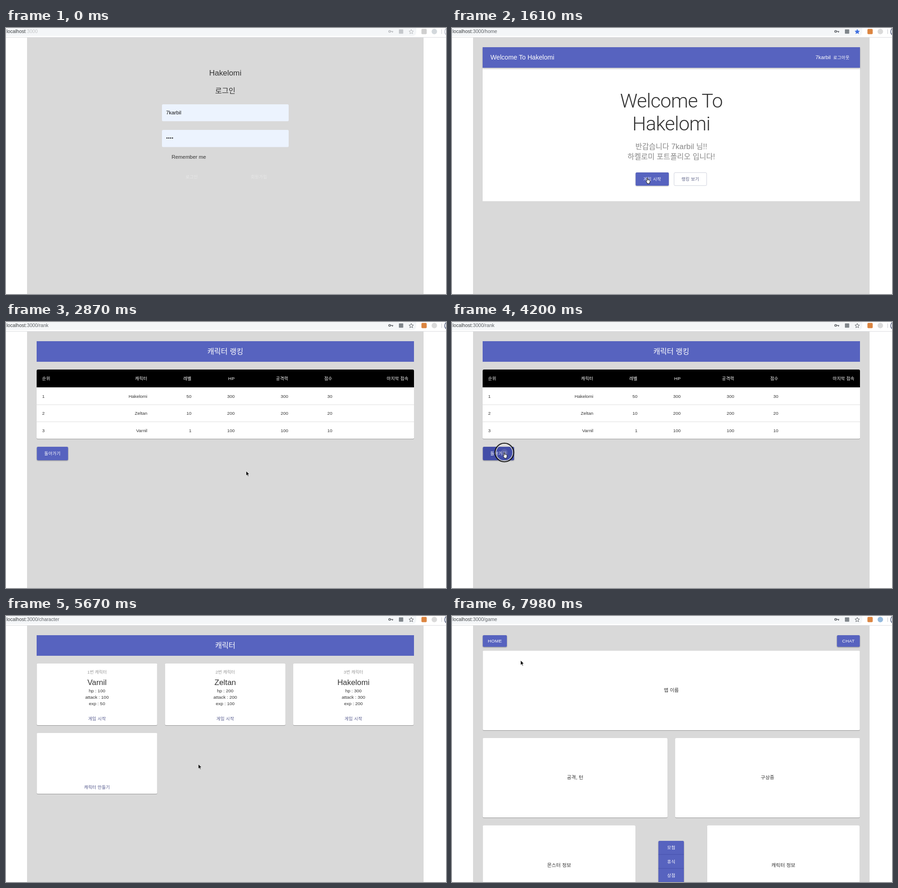
Animation, 962 px wide and 582 px high, one loop 8 s. Source, as an HTML page:

```html
<!DOCTYPE html>
<html lang="ko">
<head>
<meta charset="utf-8">
<title>Game portfolio</title>
<style>
html, body { margin: 0; width: 100%; height: 100%; overflow: hidden; background: #fff; }
svg { display: block; width: 100vw; height: 100vh; }
text { font-family: "Liberation Sans", "Noto Sans CJK KR", "Noto Sans CJK", sans-serif; fill: #333; }
.btn { font-weight: 500; letter-spacing: .28px; }
.light { font-weight: 300; }
.hero { font-family: Roboto, "Liberation Sans", sans-serif; font-weight: 300; letter-spacing: -.7px; }
.paper { fill: #fff; filter: drop-shadow(0 1px .7px rgba(0,0,0,.32)); }
.raised { fill: #5763bf; filter: drop-shadow(0 1px 1px rgba(0,0,0,.35)); }
.bar { fill: #5763bf; }
.shade { filter: drop-shadow(0 2px 1.5px rgba(0,0,0,.25)); }

#login, #home, #rank, #character, #game, .late, .dim, .port, .ext, .badge,
#arrow, #hand, #ring, #ripple, .press { animation: 8s step-end infinite; }

#login { animation-name: login; }
#home { animation-name: home; }
#rank { animation-name: rank; }
#character { animation-name: character; }
#game { animation-name: game; }
@keyframes login { 0% { opacity: 1 } 16.625%, 100% { opacity: 0 } }
@keyframes home { 0% { opacity: 0 } 16.625% { opacity: 1 } 35% { opacity: 0 } 54.25% { opacity: 1 } 69.125%, 100% { opacity: 0 } }
@keyframes rank { 0% { opacity: 0 } 35% { opacity: 1 } 54.25%, 100% { opacity: 0 } }
@keyframes character { 0% { opacity: 0 } 69.125% { opacity: 1 } 87.5%, 100% { opacity: 0 } }
@keyframes game { 0% { opacity: 0 } 87.5%, 100% { opacity: 1 } }

/* the opening moment is washed out */
.late { animation-name: late; }
.dim { animation-name: dim; }
.port { animation-name: port; }
.ext { animation-name: ext; }
.badge { animation-name: badge; }
@keyframes late { 0% { opacity: 0 } .875%, 100% { opacity: 1 } }
@keyframes dim { 0% { opacity: .4 } .875%, 100% { opacity: 1 } }
@keyframes port { 0% { fill: #c4c6c8 } .875%, 100% { fill: #5f6368 } }
@keyframes ext { 0% { fill: #cfcfcf } .875%, 100% { fill: #dc8540 } }
@keyframes badge { 0% { fill: #d3d8dc } .875% { fill: #dadada } 87.5%, 100% { fill: #93b9dd } }
.press { animation-name: press; }
@keyframes press { 0% { fill: #5763bf } 49.5%, 100% { fill: #434ea8 } }

#pointer { animation: move 8s ease-in-out infinite; }
@keyframes move {
  0%, .875% { transform: translate(430px, 512px) }
  10.5%, 24.5% { transform: translate(427px, 328px) }
  31.25%, 40% { transform: translate(525px, 326px) }
  50%, 56% { transform: translate(114.5px, 285.5px) }
  66.25%, 77% { transform: translate(420.5px, 324px) }
  84%, 92.75% { transform: translate(474px, 220px) }
  99.75%, 100% { transform: translate(150px, 97px) }
}
#arrow { animation-name: arrow; }
#hand { animation-name: hand; }
#ring { animation-name: ring; }
#ripple { animation-name: ripple; }
@keyframes arrow { 0% { opacity: 0 } .875% { opacity: 1 } 10% { opacity: 0 } 35% { opacity: 1 } 49.5% { opacity: 0 } 54.25% { opacity: 1 } 66% { opacity: 0 } 69.125%, 100% { opacity: 1 } }
@keyframes hand { 0% { opacity: 0 } 10% { opacity: 1 } 35% { opacity: 0 } 49.5% { opacity: 1 } 54.25% { opacity: 0 } 66% { opacity: 1 } 69.125%, 100% { opacity: 0 } }
@keyframes ring {
  0% { opacity: 0 } 14% { opacity: 1 } 15.75% { opacity: 0 } 32.375% { opacity: 1 } 34.125% { opacity: 0 }
  51.625% { opacity: 1 } 53.375% { opacity: 0 } 67.375% { opacity: 1 } 68.69% { opacity: 0 }
  84.875% { opacity: 1 } 86.25%, 100% { opacity: 0 }
}
@keyframes ripple {
  0% { opacity: 0 } 14% { opacity: 1 } 16.625% { opacity: 0 } 32.375% { opacity: 1 } 35% { opacity: 0 }
  51.625% { opacity: 1 } 54.25% { opacity: 0 } 67.375% { opacity: 1 } 69.125% { opacity: 0 }
  84.875% { opacity: 1 } 87.5%, 100% { opacity: 0 }
}
</style>
</head>
<body>
<svg id="stage" viewBox="0 0 962 582"></svg>
<script>
const HERO = 'Hakelomi', USER = '7karbil', MID = 479.5;
const H5 = 16.9, H6 = 14.1, BODY = 11.3, SMALL = 9.87;
const INK = '#333', LINK = '#50558a';

// Hangul runs are set slightly smaller than the Latin around them
const text = (x, y, size, str, { fill = INK, at = 'middle', cls = '' } = {}) =>
  `<text x="${x}" y="${y}" font-size="${size}" text-anchor="${at}" class="${cls}" style="fill:${fill}">` +
  str.replace(/[가-힣]+/g, '<tspan font-size=".95em">$&</tspan>') + '</text>';

const box = (x, y, r, b, cls, rx = 2.5) =>
  `<rect x="${x}" y="${y}" width="${r - x}" height="${b - y}" rx="${rx}" class="${cls}"/>`;

const button = (x, y, r, b, label, cls = '', textCls = '') =>
  `<g class="${cls}">${box(x, y, r, b, 'raised')}</g>` +
  text((x + r) / 2, (y + b) / 2 + 3.5, SMALL, label, { fill: '#fff', cls: 'btn ' + textCls });

const star = fill => {
  let pts = '';
  for (let i = 0; i < 10; i++) {
    const a = i * Math.PI / 5, r = i % 2 ? 2.3 : 5.2;
    pts += `${(886 + r * Math.sin(a)).toFixed(2)},${(8.3 - r * Math.cos(a)).toFixed(2)} `;
  }
  return `<polygon points="${pts}" fill="${fill}" stroke="${fill === 'none' ? '#5f6368' : fill}" stroke-width="1"/>`;
};

const address = (path, cls = '') =>
  `<text x="1" y="11.3" font-size="10.6" style="fill:#3c4043">localhost<tspan class="${cls}" fill="#5f6368">:3000${path}</tspan></text>`;

const scene = (id, path, body, fill = 'none') =>
  `<g id="${id}">${address(path, id === 'login' ? 'port' : '')}<g class="dim">${star(fill)}</g>${body}</g>`;

const titleBar = title => box(67, 42, 892, 87, 'bar', 0) + text(MID, 70, H5, title, { fill: '#fff' });

const chrome = `
  <rect width="962" height="582" fill="#fff"/>
  <path d="M0 0H897V9Q896 17.5 888 17.5H0Z" fill="#f4f6f8"/>
  <rect y="20" width="962" height="1" fill="#dadce0"/>
  <rect x="46" y="21" width="867" height="561" fill="#d9d9d9"/>
  <g class="dim">
    <circle cx="838.8" cy="7.5" r="2" fill="none" stroke="#5f6368" stroke-width="1.6"/>
    <path d="M841 7.5H846.5M845 7.5V10" fill="none" stroke="#5f6368" stroke-width="1.6"/>
    <rect x="859" y="3" width="9.5" height="9.5" rx="1" fill="#80868b"/>
    <circle cx="968" cy="8" r="9" fill="#eef0f3" stroke="#4a5578" stroke-width="1.4"/>
  </g>
  <rect x="908.3" y="2" width="11.5" height="11.5" rx="2" class="ext"/>
  <circle cx="936.5" cy="7.7" r="6" class="badge"/>
  <rect x="952" y="3" width="1" height="10" fill="#c8cbcf"/>`;

const field = (y, b, label) =>
  `<rect x="341" y="${y}" width="277" height="${b - y}" rx="2.5" fill="#ecf3fe"/>` +
  `<g class="late"><rect x="341.4" y="${y + .4}" width="276.2" height="${b - y - .8}" rx="2.5" fill="none" stroke="#b9bdc4" stroke-width=".8"/>` +
  text(350, y + 3, 8.6, label, { fill: '#757575', at: 'start' }) + '</g>';

const login =
  text(MID, 104, H5, HERO) + text(MID, 143, H5, '로그인') +
  field(167, 204, '아이디 *') + text(350, 189, BODY, USER, { fill: '#111', at: 'start' }) +
  field(223, 260.5, '비밀번호 *') +
  [0, 1, 2, 3].map(i => `<circle cx="${352 + i * 4}" cy="240.8" r="1.3" fill="#111"/>`).join('') +
  '<rect x="342.5" y="275.7" width="11.2" height="11.2" rx="1" fill="none" stroke="#6a6a6a" stroke-width="1.4" class="late"/>' +
  text(362, 285.5, 11.4, 'Remember me', { at: 'start' }) +
  button(341, 310.5, 471, 340, '로그인', 'late', 'dim') +
  button(488, 310.5, 618, 340, '회원가입', 'late', 'dim');

const home =
  box(67, 87, 892, 379, '', 0).replace('/>', ' fill="#fff"/>') + box(67, 42, 892, 87, 'bar shade', 0) +
  text(84, 69, H6, 'Welcome To ' + HERO, { fill: '#fff', at: 'start' }) +
  text(828, 68, BODY, USER, { fill: '#fff', at: 'end' }) +
  text(833.5, 67.8, SMALL, '로그아웃', { fill: '#fff', at: 'start', cls: 'btn' }) +
  text(MID, 173.5, 42.5, 'Welcome To', { cls: 'hero' }) +
  text(MID, 224, 42.5, HERO, { cls: 'hero' }) +
  text(MID, 264.8, H5, `반갑습니다 ${USER} 님!!`, { fill: '#878787', cls: 'light' }) +
  text(MID, 287.3, H5, '하켈로미 포트폴리오 입니다!', { fill: '#878787', cls: 'light' }) +
  button(401.5, 316, 474, 345, '게임 시작') +
  '<rect x="485.5" y="316.4" width="71.3" height="28.4" rx="2.5" fill="#fff" stroke="#c9ccd8" stroke-width=".9"/>' +
  text(521, 334, SMALL, '랭킹 보기', { fill: '#5a5f85', cls: 'btn' });

const ends = [309, 405.5, 500, 617, 713.5, 880];
const players = [
  [HERO, 50, 300, 300, 30],
  ['Zeltan', 10, 200, 200, 20],
  ['Varnil', 1, 100, 100, 10]
];
const row = (first, cells, y, opt) =>
  text(79, y, SMALL, first, { ...opt, at: 'start' }) +
  cells.map((c, i) => text(ends[i], y, SMALL, String(c), { ...opt, at: 'end' })).join('');

const rank =
  titleBar('캐릭터 랭킹') + box(67, 104, 892, 255.5, 'paper') +
  '<path d="M67 143V107Q67 104 70 104H889Q892 104 892 107V143Z" fill="#000"/>' +
  '<path d="M67 181H892M67 218.3H892" stroke="#dcdcdc"/>' +
  row('순위', ['캐릭터', '레벨', 'HP', '공격력', '점수', '마지막 접속'], 127.3, { fill: '#fff', cls: 'btn' }) +
  players.map((p, i) => row(String(i + 1), p, 166 + i * 37.3)).join('') +
  button(67.5, 273, 135.7, 302.5, '돌아가기').replace('class="raised"', 'class="raised press"');

const card = (i, [name, , hp, attack], exp) => {
  const x = 67.3 + i * 280.3, c = x + 131.7;
  return box(x, 104, x + 263.3, 239, 'paper') +
    text(c, 126, SMALL, `${i + 1}번 캐릭터`, { fill: '#999', cls: 'light' }) +
    text(c, 150.5, H5, name) +
    [`hp : ${hp}`, `attack : ${attack}`, `exp : ${exp}`]
      .map((s, k) => text(c, 166.8 + k * 14.1, 9.95, s)).join('') +
    text(c, 227.6, SMALL, '게임 시작', { fill: LINK, cls: 'btn' });
};
const character =
  titleBar('캐릭터') +
  [50, 100, 200].map((exp, i) => card(i, players[2 - i], exp)).join('') +
  box(67.3, 256, 330.6, 389, 'paper') +
  text(199, 378, SMALL, '캐릭터 만들기', { fill: LINK, cls: 'btn' });

const panel = (x, y, r, label) =>
  box(x, y, r, y + 174, 'paper') + text((x + r) / 2, y + 90.3, BODY, label);

const game =
  button(67.3, 42, 120, 67.6, 'HOME') + button(841.7, 42, 891.6, 67.6, 'CHAT') +
  panel(67.3, 76, 891.7, '맵 이름') +
  panel(67.3, 267, 471, '공격, 턴') + panel(488, 267, 891.7, '구상중') +
  panel(67.3, 458.3, 401, '몬스터 정보') + panel(557.8, 458.3, 891, '캐릭터 정보') +
  box(451.3, 492, 507, 584, 'raised') +
  '<path d="M451.3 521.7H507M451.3 552.2H507" stroke="#434ea8" stroke-width=".8"/>' +
  ['모험', '휴식', '상점'].map((s, i) =>
    text(MID, 510.3 + i * 30.3, SMALL, s, { fill: '#fff', cls: 'btn' })).join('');

const pointer = `<g id="pointer">
  <circle id="ripple" r="7.5" fill="rgba(150,150,175,.3)"/>
  <g id="ring" fill="none">
    <circle r="18.6" stroke="#fff" stroke-width="1.6"/>
    <circle r="20.3" stroke="#000" stroke-width="2.1"/>
  </g>
  <path id="arrow" d="M0 0V10.4L2.4 8.2L4 12L5.7 11.3L4.1 7.6H7.3Z" fill="#000" stroke="#fff" stroke-width=".8"/>
  <path id="hand" d="M-.9 .6Q0 -.7 .9 .6V4.2L2.3 4.3L4 4.8L5.6 5.4Q6.2 6 6 8L5 10.6V12.6H-.2V11.2L-2.9 7.6Q-3.2 6.2 -1.9 6.3L-.9 7.3Z" fill="#fff" stroke="#111" stroke-width="1" stroke-linejoin="round"/>
</g>`;

document.getElementById('stage').innerHTML = chrome +
  scene('login', '', login) +
  scene('home', '/home', home, '#3f6fe0') +
  scene('rank', '/rank', rank) +
  scene('character', '/character', character) +
  scene('game', '/game', game) +
  pointer;
</script>
</body>
</html>
```
